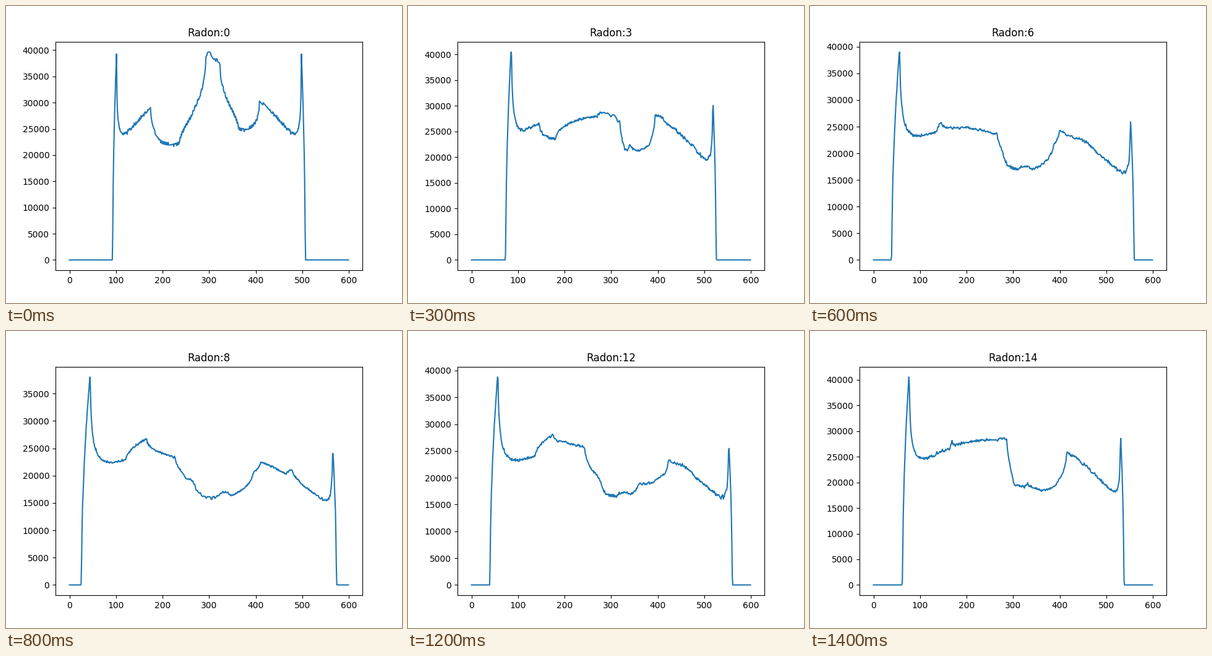
These frames come from a looping animation (640x480 px, 1500 ms). A matplotlib script:

```python
import numpy as np
import matplotlib.pyplot as plt
from matplotlib.animation import FuncAnimation

SIZE = 600
FRAMES = 15
STEP_DEG = 10
PIVOT = SIZE / 2

plt.rcParams["text.kerning_factor"] = 6


def head_phantom():
    """Grey image of a head section, row 0 at the top."""
    axis = np.linspace(-1, 1, SIZE)
    x, y = np.meshgrid(axis, -axis)
    image = np.zeros((SIZE, SIZE))

    def add(level, a, b, cx=0, cy=0, tilt=0):
        c, s = np.cos(np.radians(tilt)), np.sin(np.radians(tilt))
        u = (x - cx) * c + (y - cy) * s
        v = (y - cy) * c - (x - cx) * s
        image[(u / a) ** 2 + (v / b) ** 2 <= 1] += level

    # skull, brain, then the two dark ventricles leaning apart
    add(1, 0.69, 0.92)
    add(-0.8, 0.6624, 0.874, cy=-0.0184)
    add(-0.2, 0.11, 0.31, cx=0.22, tilt=-18)
    add(-0.2, 0.16, 0.41, cx=-0.22, tilt=18)

    # bright spots: one large, two on the midline, three near the base
    add(0.1, 0.21, 0.25, cy=0.35)
    spot = 0.046
    for side in (1, -1):
        add(0.1, spot, spot, cy=0.1 * side)
    add(0.1, spot, spot / 2, -0.08, -0.605)
    add(0.1, spot / 2, spot / 2, 0, -0.606)
    add(0.1, spot / 2, spot, 0.06, -0.605)
    return 255 * image


def rotate(image, degrees):
    """Turn counterclockwise about the pivot with bilinear sampling."""
    c, s = np.cos(np.radians(degrees)), np.sin(np.radians(degrees))
    axis = np.arange(SIZE) - PIVOT
    x, y = np.meshgrid(axis, -axis)
    col = x * c + y * s + PIVOT
    row = PIVOT - (y * c - x * s)
    inside = (col >= 0) & (col <= SIZE - 1) & (row >= 0) & (row <= SIZE - 1)
    j = np.clip(np.floor(col).astype(int), 0, SIZE - 2)
    i = np.clip(np.floor(row).astype(int), 0, SIZE - 2)
    dx, dy = col - j, row - i
    top = image[i, j] * (1 - dx) + image[i, j + 1] * dx
    bottom = image[i + 1, j] * (1 - dx) + image[i + 1, j + 1] * dx
    return np.where(inside, top * (1 - dy) + bottom * dy, 0)


phantom = head_phantom()
profiles = [rotate(phantom, STEP_DEG * k).sum(axis=0) for k in range(FRAMES)]

fig, ax = plt.subplots(figsize=(6.4, 4.8), dpi=100)


def draw(k):
    ax.clear()
    ax.plot(profiles[k])
    ax.set_title(f"Radon:{k}")


anim = FuncAnimation(fig, draw, frames=FRAMES, init_func=lambda: None,
                     interval=100, repeat=True, repeat_delay=0)
plt.show()
```
